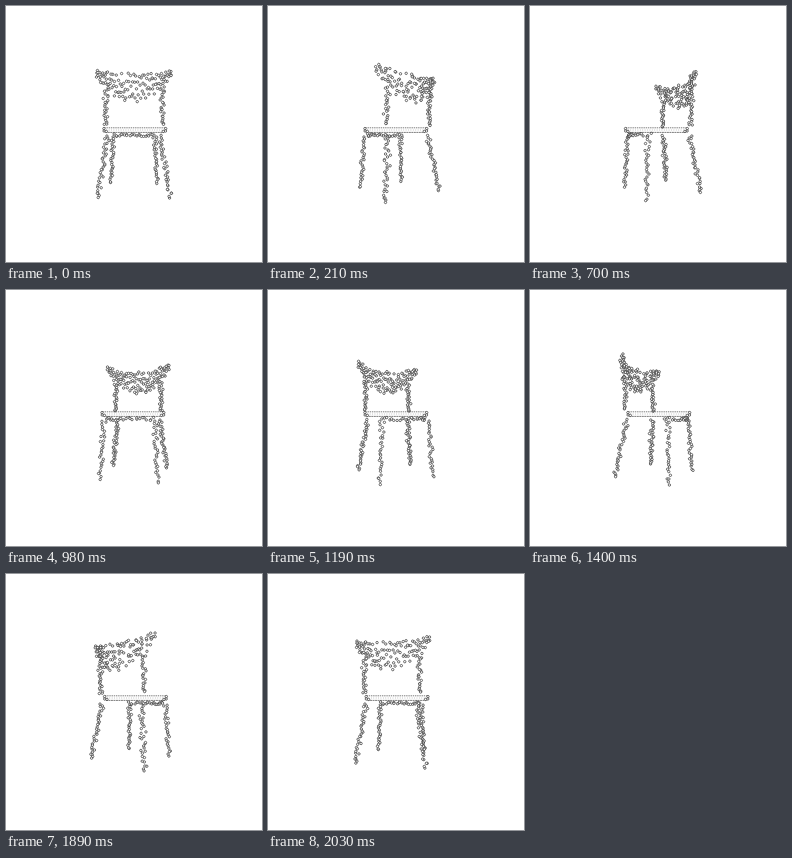
An HTML page with a canvas for the animation above (2100 ms loop, 256 by 256 pixels).

```html
<!DOCTYPE html>
<html>
<head>
<meta charset="utf-8">
<style>
html, body { margin: 0; width: 100%; height: 100%; overflow: hidden; background: #fff; }
canvas { display: block; width: 256px; height: 256px; }
</style>
</head>
<body>
<canvas id="stage"></canvas>
<script>
const SIZE = 256, STEP = 70, STEPS = 30;
const CAMERA = 200, CENTER = 128, HORIZON = 130;

const canvas = document.getElementById('stage');
const ratio = window.devicePixelRatio || 1;
canvas.width = canvas.height = SIZE * ratio;
const ctx = canvas.getContext('2d');
ctx.scale(ratio, ratio);

let seed = 41;
function random() {
  seed = (seed * 1664525 + 1013904223) % 4294967296;
  return seed / 4294967296;
}
const spread = r => (random() * 2 - 1) * r;
const mix = (a, b, t) => a + (b - a) * t;

// Each bead is [x, height above the horizon, depth]; the backrest has positive depth.
const beads = [];

function addBar(from, to, count, radius) {
  for (let i = 0; i < count; i++) {
    const t = (i + random()) / count;
    const r = radius * (1 - 0.3 * t);
    beads.push([
      mix(from[0], to[0], t) + spread(r),
      mix(from[1], to[1], t),
      mix(from[2], to[2], t) + spread(r)
    ]);
  }
}

function addBackrest(count) {
  for (let i = 0; i < count; i++) {
    const u = ((i + random()) / count) * 2 - 1;
    const low = 28.5 + 25 * u * u, high = 54 + 6 * u * u;
    const v = (i * 0.618 + random() * 0.25) % 1;
    beads.push([u * 34.5, mix(low, high, v), 28 - 10 * u * u + spread(2.8)]);
  }
}

function addApron(count) {
  for (let i = 0; i < count; i++) {
    const a = ((i + random()) / count - 0.5) * 1.75;
    beads.push([29 * Math.sin(a), 1 + spread(1.6), -29 * Math.cos(a)]);
  }
}

for (const side of [-1, 1]) {
  addBar([side * 25, 43, 22], [side * 25.5, 9, 20.5], 23, 2.3);
  addBar([side * 23.5, 1, 21], [side * 31.5, -54, 29], 34, 2.4);
  addBar([side * 23, 0, -23], [side * 26, -54, -26], 28, 2.2);
}
addBackrest(118);
addApron(24);

function project([x, y, z], angle) {
  const c = Math.cos(angle), s = Math.sin(angle);
  const depth = z * c - x * s;
  const scale = CAMERA / (CAMERA - depth);
  return { x: CENTER + (x * c + z * s) * scale, y: HORIZON - y * scale, depth };
}

function ring(x, y, r = 1.2) {
  ctx.beginPath();
  ctx.arc(x, y, r, 0, Math.PI * 2);
  ctx.fill();
  ctx.stroke();
}

function line(x1, x2, y, color, dash) {
  ctx.strokeStyle = color;
  ctx.setLineDash(dash);
  ctx.beginPath();
  ctx.moveTo(x1, y);
  ctx.lineTo(x2, y);
  ctx.stroke();
}

function drawSeat(angle) {
  const mid = CENTER - 1.6 * Math.sin(angle - Math.PI / 6);
  const left = mid - 32.5, right = mid + 32.5;
  ctx.lineWidth = 0.7;
  line(left + 2, right - 2, 121.8, '#444', [1.4, 0.8]);
  line(left + 4, right - 4, 124, '#999', [0.8, 1.6]);
  line(left + 3, right - 3, 126.4, '#444', [2, 0.5]);
  ctx.setLineDash([]);
  ctx.strokeStyle = '#222';
  ctx.lineWidth = 0.65;
  for (const [x, inward] of [[left, 1], [right, -1]]) {
    ring(x + inward * 1.6, 122.6);
    ring(x + inward * 1.8, 125);
    ring(x + inward * 4, 125.4);
  }
}

function draw(angle) {
  ctx.fillStyle = '#fff';
  ctx.fillRect(0, 0, SIZE, SIZE);
  ctx.strokeStyle = '#222';
  ctx.lineWidth = 0.65;
  beads.map(b => project(b, angle))
    .sort((a, b) => a.depth - b.depth)
    .forEach(p => ring(p.x, p.y));
  drawSeat(angle);
}

const start = performance.now();
function tick() {
  const step = Math.floor(Math.max(0, performance.now() - start) / STEP) % STEPS;
  draw(step / STEPS * Math.PI * 2);
  requestAnimationFrame(tick);
}
tick();
</script>
</body>
</html>
```
